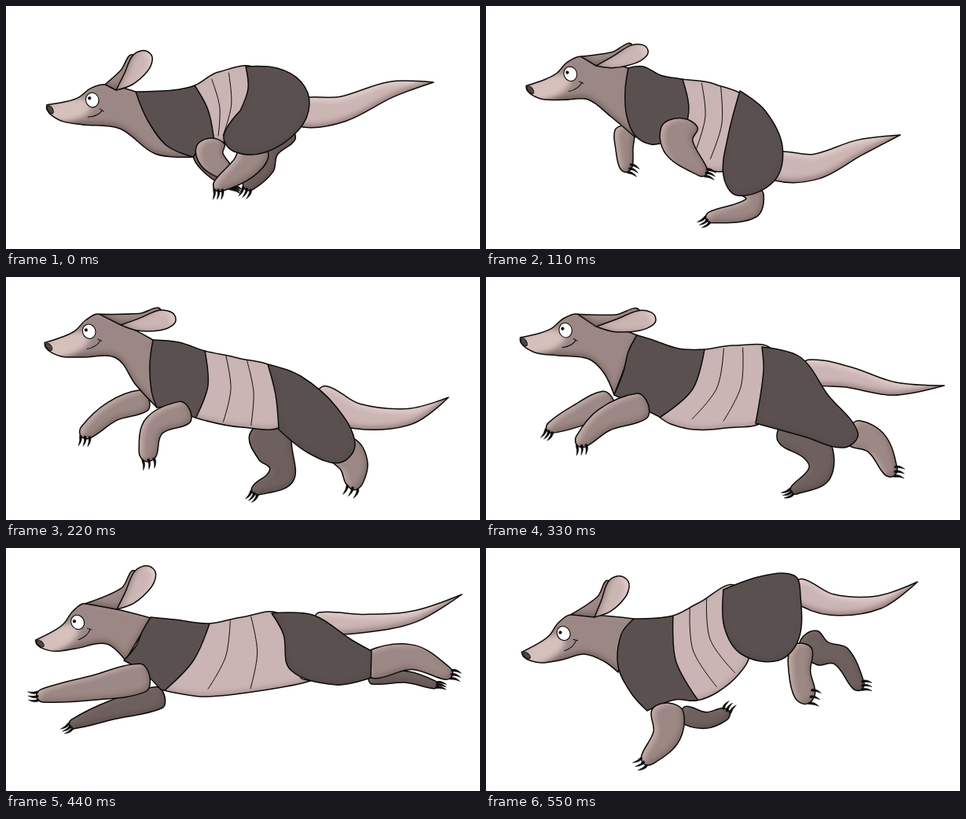
An HTML page for the animation above (660 ms loop, 603 by 309 pixels).

```html
<!DOCTYPE html>
<html lang="en">
<head>
<meta charset="utf-8">
<title>Running armadillo</title>
<style>
html, body { margin: 0; width: 100%; height: 100%; overflow: hidden; background: #fff; }
svg { display: block; width: 100%; height: 100%; }
</style>
</head>
<body>
<svg id="stage" viewBox="0 0 603 309">
  <defs>
    <filter id="soft" filterUnits="userSpaceOnUse" x="-100" y="-100" width="900" height="600">
      <feGaussianBlur stdDeviation="3.2"/>
    </filter>
  </defs>
</svg>
<script>
const stage = document.getElementById('stage');
const FRAME = 110;
const INK = '#0d0a0a';
let layer, clips = 0;

// fill, light colour and shift, shade colour and shift
const STYLES = {
  tail: ['#ccb6b4', '#e6d4d2', '1 5', '#87716e', '-1 -4'],
  head: ['#9b8783', '#a8948f', '0 2', '#6b5a57', '0 -4'],
  ear: ['#ccb6b4', '#e6d4d2', '-5 2', '#937d79', '4 -1'],
  band: ['#cab5b4', '#cab5b4', '0 1', '#a08b89', '0 -3'],
  dark: ['#5b5050', '#645959', '0 2', '#514646', '0 -2'],
  near: ['#9c8884', '#d0b9b5', '5 2', '#75645f', '-3 -3'],
  far: ['#6e605e', '#7d6e6b', '4 2', '#584c4a', '-2 -3']
};

function el(name, attrs, parent = layer) {
  const node = document.createElementNS('http://www.w3.org/2000/svg', name);
  for (const key in attrs) node.setAttribute(key, attrs[key]);
  parent.append(node);
  return node;
}

const pt = (x, y, sharp = false) => ({ x, y, sharp });
const mix = (a, b, t) => a + (b - a) * t;

// "x,y" words; a trailing * marks a corner.
const parse = text => text.split(' ').map(s =>
  pt(...s.replace('*', '').split(',').map(Number), s.endsWith('*')));

// Smooth path through points, with handles along the neighbours' chord.
function curve(pts, closed) {
  const n = pts.length;
  const handle = (i, len) => {
    const p = pts[i];
    if (p.sharp || (!closed && (i === 0 || i === n - 1))) return [0, 0];
    const a = pts[(i + n - 1) % n], b = pts[(i + 1) % n];
    const k = len / 3 / (Math.hypot(b.x - a.x, b.y - a.y) || 1);
    return [(b.x - a.x) * k, (b.y - a.y) * k];
  };
  let d = `M${pts[0].x} ${pts[0].y}`;
  for (let i = 0; i < (closed ? n : n - 1); i++) {
    const j = (i + 1) % n, p = pts[i], q = pts[j];
    const len = Math.hypot(q.x - p.x, q.y - p.y);
    const [ax, ay] = handle(i, len), [bx, by] = handle(j, len);
    d += `C${p.x + ax} ${p.y + ay} ${q.x - bx} ${q.y - by} ${q.x} ${q.y}`;
  }
  return closed ? d + 'Z' : d;
}

function ink(d, width, parent = layer, fill = 'none') {
  el('path', { d, fill, stroke: INK, 'stroke-width': width,
    'stroke-linejoin': 'round', 'stroke-linecap': 'round' }, parent);
}

// A closed shape with soft light and shade inside its rim.
function part(kind, pts) {
  const [fill, light, lightBy, shade, shadeBy] = STYLES[kind];
  const d = curve(pts, true), id = 'clip' + clips++;
  el('path', { d }, el('clipPath', { id }));
  const inside = el('g', { 'clip-path': `url(#${id})` });
  el('path', { d, fill }, inside);
  const rim = (color, by) => el('path', {
    d: 'M-90-90H700V400H-90Z' + d, fill: color, 'fill-rule': 'evenodd',
    opacity: .8, filter: 'url(#soft)', transform: `translate(${by})`
  }, inside);
  rim(light, lightBy);
  rim(shade, shadeBy);
  ink(d, 1.5);
  return inside;
}

// Three tapered claws spread across the end of a foot.
function claws(foot, r, angle) {
  const a = angle * Math.PI / 180, ux = Math.cos(a), uy = Math.sin(a);
  for (const side of [-.65, 0, .65]) {
    const x = foot.x + ux * r * .5 - uy * r * side;
    const y = foot.y + uy * r * .5 + ux * r * side;
    const at = (along, across) => `${x + ux * along - uy * across} ${y + uy * along + ux * across}`;
    ink(`M${at(0, -1.3)}Q${at(6, -3.5)} ${at(13, 1.5)}Q${at(6, -.2)} ${at(0, 1.3)}Z`, .5, layer, INK);
  }
}

// A tapering tube along its joints; a zero end radius gives a pointed tip.
function limb(kind, text, r0, r1, clawAngle) {
  const joints = parse(text), last = joints.length - 1, left = [], right = [];
  const offset = (p, x, y) => pt(p.x + x, p.y + y);
  const heading = i => {
    const a = joints[Math.max(0, i - 1)], b = joints[Math.min(last, i + 1)];
    const len = Math.hypot(b.x - a.x, b.y - a.y);
    return [(b.x - a.x) / len, (b.y - a.y) / len];
  };
  joints.forEach((p, i) => {
    const r = mix(r0, r1, (i / last) ** 2), [x, y] = heading(i);
    if (!r) return;
    left.push(offset(p, y * r, -x * r));
    right.unshift(offset(p, -y * r, x * r));
  });
  const [sx, sy] = heading(0), [ex, ey] = heading(last), foot = joints[last];
  const tip = offset(foot, ex * r1 * .8, ey * r1 * .8);
  tip.sharp = !r1;
  part(kind, [...left, tip, ...right, offset(joints[0], -sx * r0 * .5, -sy * r0 * .5)]);
  if (clawAngle !== undefined) claws(foot, r1, clawAngle);
}

// The skull is one rigid shape; only the neck and the ear bend.
const BROW = parse('-3,-6* 22,-5 39,-7 56,-15 75,-16');
const JAW = parse('36,28 13,19 1,9 -4,0');

function head([x, y, angle], neck, [bx, by, tx, ty, w]) {
  const a = angle * Math.PI / 180, c = Math.cos(a), s = Math.sin(a);
  const turn = p => pt(x + p.x * c - p.y * s, y + p.x * s + p.y * c, p.sharp);
  const brow = BROW.map(turn);
  const inside = part('head', [...brow, ...parse(neck), ...JAW.map(turn)]);
  const transform = `translate(${x} ${y}) rotate(${angle})`;
  el('ellipse', { cx: 21, cy: 6, rx: 32, ry: 14, fill: '#d6c0bc', filter: 'url(#soft)', transform }, inside);
  const face = el('g', { transform });
  el('ellipse', { cy: 1, rx: 3, ry: 5.6, fill: '#514443', stroke: INK, transform: 'rotate(-18)' }, face);
  el('ellipse', { cx: 55, rx: 8.2, ry: 9.3, fill: '#fff', stroke: INK, 'stroke-width': 1.1 }, face);
  el('circle', { cx: 52, cy: -3, r: 2.1, fill: INK }, face);
  ink('M45 20Q57 22 64 16M62 13L66 17', 1, face);

  const dx = tx - bx, dy = ty - by, len = Math.hypot(dx, dy);
  const leaf = (t, side) => pt(bx + dx * t + dy / len * side * w, by + dy * t - dx / len * side * w);
  const crown = brow[brow.length - 1];
  part('head', [pt(crown.x, crown.y, true), leaf(.35, .9), leaf(.75, 1), leaf(.4, 0), pt(bx, by, true)]);
  part('ear', [pt(bx, by, true), leaf(.35, .45), leaf(.72, 1), leaf(.93, .7), leaf(1, 0),
    leaf(.93, -.6), leaf(.7, -.95), leaf(.3, -.75)]);
}

// Dark shoulder in front of the first seam, plates spaced evenly to the second.
function torso(text, front, rear) {
  const inside = part('band', parse(text));
  const seam = t => {
    const [x1, y1, x2, y2, bow] = front.map((v, i) => mix(v, rear[i], t));
    const len = Math.hypot(x2 - x1, y2 - y1);
    return curve([pt(x1, y1), pt((x1 + x2) / 2 + (y2 - y1) / len * bow,
      (y1 + y2) / 2 - (x2 - x1) / len * bow), pt(x2, y2)]);
  };
  ink(seam(0) + 'V400H-50V-50H' + front[0] + 'Z', 1.5, inside, STYLES.dark[0]);
  ink(seam(1 / 3) + seam(2 / 3), 1, inside);
}

const poses = [
  {
    tail: ['376,136 428,131 490,106 544,97', 18],
    farLeg: ['far', '358,160 334,182 330,205 308,228', 14, 8, 110],
    farArm: ['far', '248,188 262,208 286,230', 11, 4, 20],
    skull: [56, 131, -12], neck: '165,109* 238,192* 190,188 145,156', ear: [140, 107, 183, 60, 14],
    torso: '165,109* 212,107 240,101 270,84 320,82 310,140 283,172 258,172 238,192* 205,178 180,145',
    front: [240, 101, 264, 165, 5], rear: [305, 77, 282, 165, 8],
    nearArm: ['near', '260,177 262,195 280,212', 18, 10],
    nearLeg: ['near', '318,182 302,206 270,229', 19, 8, 90],
    rump: '305,77* 345,79 375,96 386,125 372,158 330,186 290,185 277,165 298,133* 308,105'
  },
  {
    tail: ['368,204 420,204 475,180 527,164', 18],
    farArm: ['near', '176,158 176,182 178,205', 12, 8, 20],
    skull: [56, 106, -21], neck: '181,79* 190,167* 158,140 130,119', ear: [140, 76, 206, 56, 12],
    torso: '181,79* 200,77 222,88 250,93 290,99 335,125 310,205 284,209 262,192 235,174 210,176 190,165 179,140 177,108',
    front: [250, 93, 250, 168, 8], rear: [323, 108, 303, 208, 8],
    nearArm: ['near', '246,154 246,180 276,211', 23, 7, 15],
    nearLeg: ['near', '338,238 337,257 285,269', 15, 7, 140],
    rump: '323,108* 355,133 377,178 367,222 320,241 302,215 308,165'
  },
  {
    tail: ['400,155 447,177 515,177 563,153', 18],
    farLeg: ['far', '332,195 343,226 350,253 318,271', 24, 7, 120],
    farArm: ['near', '175,157 135,171 101,198', 14, 9, 95],
    skull: [54, 88, -20], neck: '187,80* 192,166* 165,137 140,103', ear: [146, 61, 216, 53, 13],
    torso: '187,80* 220,83 253,94 295,103 345,120 355,185 300,191 241,179 215,166 192,166* 185,145 183,110',
    front: [253, 94, 241, 180, 10], rear: [333, 111, 347, 193, 4],
    nearArm: ['near', '227,172 188,190 180,226', 15, 11, 80],
    nearLeg: ['near', '428,218 443,240 443,262', 20, 11, 110],
    rump: '333,111* 375,126 420,165 444,212 425,236 385,224 347,194* 343,150'
  },
  {
    tail: ['408,120 460,127 520,142 583,138', 15],
    farLeg: ['far', '385,192 420,218 424,250 392,271', 22, 6, 150],
    farArm: ['near', '155,160 115,177 82,192', 16, 7, 115],
    skull: [48, 82, -15], neck: '192,74* 163,150* 150,122 130,104', ear: [140, 63, 216, 53, 13],
    torso: '192,74* 212,80 245,91 278,92 315,87 365,95 355,180 305,192 265,194 235,187 219,177* 185,160 163,150* 175,120 181,95',
    front: [278, 92, 222, 178, 15], rear: [351, 89, 342, 186, 8],
    nearArm: ['near', '198,164 150,182 121,209', 17, 9, 85],
    nearLeg: ['near', '468,198 497,212 515,247', 17, 9, 5],
    rump: '351,89* 400,102 435,150 473,198 455,217 405,203 343,186* 353,120'
  },
  {
    tail: ['398,95 455,96 520,87 580,59', 13],
    farLeg: ['far', '465,165 510,164 545,174', 8, 5, 5],
    farArm: ['far', '195,190 135,206 85,224', 14, 6, 140],
    skull: [43, 121, -29], neck: '184,89* 152,143* 128,122', ear: [141, 78, 187, 26, 15],
    torso: '184,88* 215,91 259,96 300,88 350,86 375,165 387,169 320,182 255,189 220,185 197,180* 175,158 150,143* 165,125 174,105',
    front: [259, 96, 203, 180, 9], rear: [338, 83, 365, 178, 8],
    nearArm: ['near', '174,165 110,178 45,188', 18, 8, 175],
    nearLeg: ['near', '465,148 518,139 562,160', 18, 8, 10],
    rump: '338,83* 390,85 440,117 465,131* 464,165* 420,174 362,155 353,110'
  },
  {
    tail: ['396,53 440,72 500,69 549,43', 15],
    farLeg: ['far', '410,118 428,134 452,138 474,175', 17, 8, 0],
    farArm: ['far', '252,212 280,219 304,211', 11, 8, -60],
    skull: [51, 136, -30], neck: '188,90* 168,158* 150,144 125,135', ear: [138, 88, 178, 39, 15],
    torso: '188,90* 238,86 270,70 320,50 335,135 322,160 295,183 268,194 240,193 205,207* 185,185 168,150 172,110',
    front: [238, 86, 270, 194, -13], rear: [302, 53, 340, 141, -15],
    nearArm: ['near', '231,207 229,240 205,269', 20, 9, 145],
    nearLeg: ['near', '401,128 399,158 406,188', 14, 13, 10],
    rump: '302,53* 350,36 392,35 400,60 398,115 372,143 325,135 303,100'
  }
];

const layers = poses.map(p => {
  const group = layer = el('g', { display: 'none' }, stage);
  limb('tail', ...p.tail, 0);
  if (p.farLeg) limb(...p.farLeg);
  limb(...p.farArm);
  head(p.skull, p.neck, p.ear);
  torso(p.torso, p.front, p.rear);
  limb(...p.nearArm);
  limb(...p.nearLeg);
  part('dark', parse(p.rump));
  return group;
});

const start = performance.now();
let shown = -1;

function show(now) {
  const i = Math.floor(Math.max(0, now - start) / FRAME) % layers.length;
  if (i !== shown) {
    layers.forEach((g, k) => g.setAttribute('display', k === i ? 'inline' : 'none'));
    shown = i;
  }
  requestAnimationFrame(show);
}
show(start);
</script>
</body>
</html>
```
